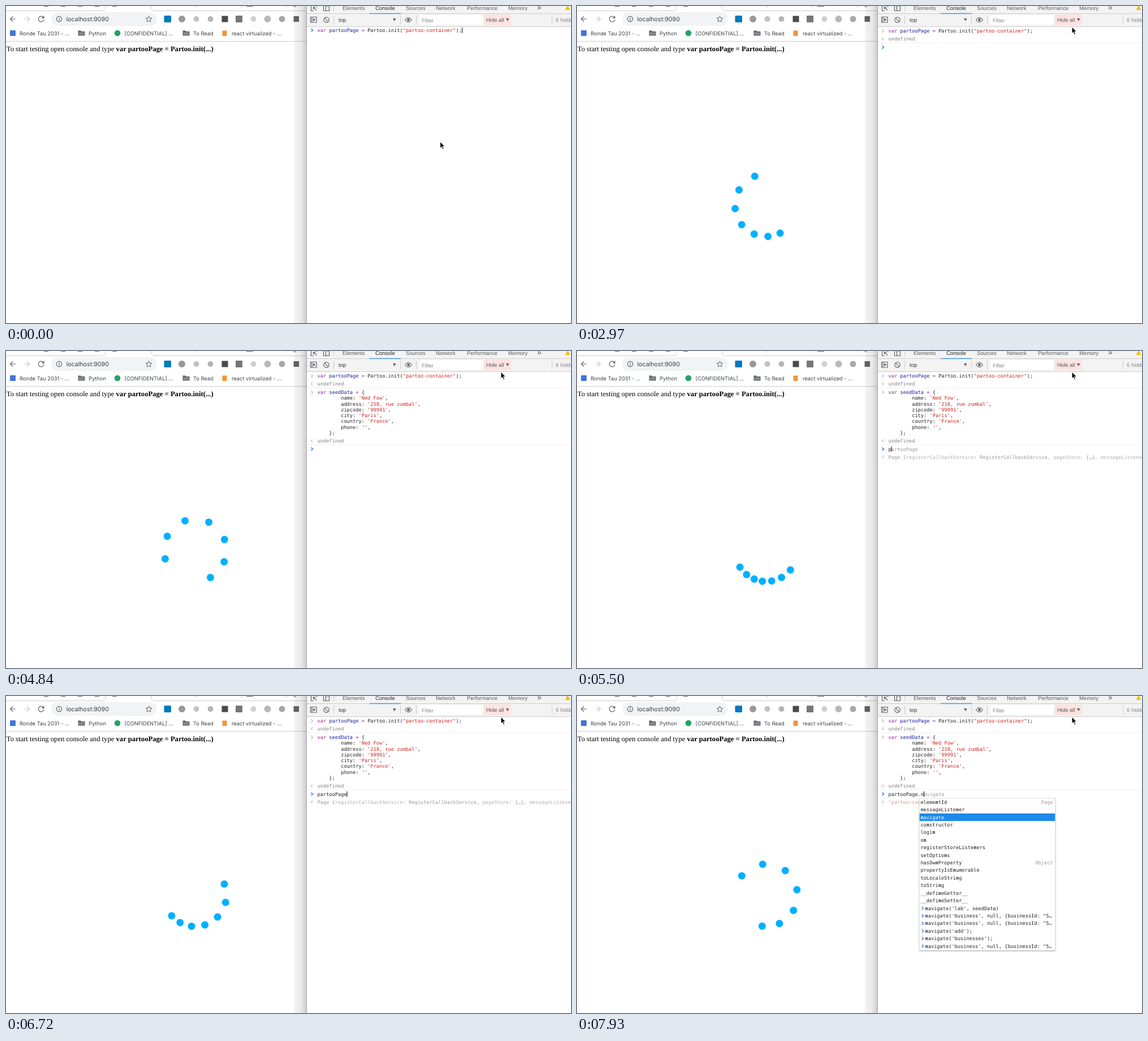
An HTML page for the animation above (8000 ms loop, 999 by 561 pixels).

```html
<!DOCTYPE html>
<html lang="en">
<head>
<meta charset="utf-8">
<title>Console demo</title>
<style>
  html, body { margin: 0; width: 100%; height: 100%; overflow: hidden; background: #fff; }
  svg { display: block; width: 999px; height: 561px; }
  text { white-space: pre; text-rendering: geometricPrecision; }
  .ui { font: 9.3px Inter, sans-serif; fill: #3c4043; }
  .page { font: 12.63px "Liberation Serif", serif; fill: #000; }
  .dev { font: 9.46px "Liberation Sans", sans-serif; fill: #5a5a5a; }
  .mono { font: 8.67px "DejaVu Sans Mono", monospace; fill: #222; }
  .line { fill: none; stroke: #5f6368; stroke-width: 1.2; }
  .rule { fill: none; stroke: #ccc; }
  .kw { fill: #a0189a; }
  .def { fill: #1a1aa6; }
  .str { fill: #d0211c; }
  .dim { fill: #808080; }
  .ghost { fill: #999; }
  .key { fill: #b0b0b0; }
  .soft { fill: #ea8f8b; }
  .hit { fill: #fff; }
  .dark { fill: #222; }
  .b { font-weight: bold; }
</style>
</head>
<body>
<svg viewBox="0 0 999 561">
  <defs>
    <linearGradient id="shade">
      <stop offset="0" stop-opacity=".04"/>
      <stop offset=".6" stop-opacity=".09"/>
      <stop offset="1" stop-opacity=".2"/>
    </linearGradient>
    <filter id="drop" x="-5%" y="-5%" width="110%" height="110%">
      <feDropShadow dx="0" dy="1" stdDeviation="1.2" flood-opacity=".4"/>
    </filter>
    <g id="folder" fill="#5f6368">
      <path d="M-6-4.500h4.500l1.500 1.500h6v7.500h-12z"/>
      <path d="M-4.800-1.700h9.600v5h-9.600z" fill="#858a8e"/>
    </g>
  </defs>

  <!-- browser window -->
  <rect width="531" height="561" fill="#fff"/>
  <path class="rule" d="M0 8.500H171Q176.500 8.500 176.500 0M256.500 0Q256.500 8.500 262 8.500H531M336.500 0V3M416.500 0V3M495.500 0V3"/>
  <path d="M67 .5h8M97 .5h8M127 .5h8M157 .5h8M188 .5h8M425 .5h12M508 0l5 2" stroke="#666" fill="none"/>
  <path class="line" d="M17 23H7.500M12 18.500L7.500 23l4.500 4.500"/>
  <path class="line" d="M32 23h9.500M37 18.500l4.500 4.500-4.500 4.500" style="stroke:#c4c6c8"/>
  <path class="line" d="M66.300 20.200a4.900 4.900 0 1 0 .8 3.600"/>
  <path d="M67.500 17.300v4.600h-4.600z" fill="#5f6368"/>
  <rect x="80" y="11" width="187" height="24" rx="12" fill="#f1f3f4"/>
  <circle class="line" cx="94" cy="23" r="4.700"/>
  <path class="line" d="M94 22.300v3.200M94 20v1.200"/>
  <text class="ui" x="106.500" y="27" style="font-size:10.7px">localhost:9090</text>
  <path class="line" d="M252.500 17.800l1.500 3.600 3.900.3-3 2.500.9 3.800-3.300-2-3.300 2 .9-3.800-3-2.500 3.900-.3z" style="stroke-width:1"/>
  <rect x="279.500" y="17" width="12.500" height="12" rx="1.500" fill="#0079bf"/>
  <circle cx="311" cy="23" r="6" fill="#999"/>
  <circle cx="336.500" cy="23" r="5" fill="#c2c2c2"/>
  <circle cx="361.500" cy="23" r="5" fill="#b4b4b4"/>
  <rect x="381.500" y="17.500" width="11" height="11" fill="#4a4a4a"/>
  <rect x="406" y="17" width="12" height="12" rx="1" fill="#777"/>
  <circle cx="437.500" cy="23" r="5" fill="#cfcfcf"/>
  <circle cx="462.500" cy="23" r="6" fill="#b8b8b8"/>
  <circle cx="488" cy="23" r="5.500" fill="#a8a8a8"/>
  <rect x="508.500" y="18" width="9.500" height="10" fill="#666"/>

  <rect x="7" y="43" width="10" height="10" rx="1" fill="#4374d9"/>
  <text class="ui" x="24" y="51.500">Ronde Tau 2031 - ...</text>
  <use href="#folder" x="133.500" y="48"/>
  <text class="ui" x="146" y="51.500">Python</text>
  <circle cx="197" cy="48" r="5.300" fill="#1fa463"/>
  <text class="ui" x="209.500" y="51.500">[CONFIDENTIAL] ...</text>
  <use href="#folder" x="318.500" y="48"/>
  <text class="ui" x="331" y="51.500">To Read</text>
  <rect x="382.500" y="43.500" width="8" height="9.500" fill="#f0963c"/>
  <text class="ui" x="399" y="51.500">react virtualized - ...</text>
  <path class="rule" d="M0 62.500H531"/>
  <text class="page" x=".8" y="80">To start testing open console and type <tspan class="b">var partooPage = Partoo.init(...)</tspan></text>
  <g id="dots" fill="#00b0ff"></g>
  <rect x="509" width="22" height="561" fill="url(#shade)"/>

  <!-- developer tools -->
  <rect x="531" width="468" height="561" fill="#fff"/>
  <rect x="531" width="468" height="36" fill="#f3f3f3"/>
  <path class="rule" d="M531 13.500H999M531 36.500H999M579.500 0V9M579.500 17V32M697.500 17V32M725.500 17V32M965.500 17V32"/>
  <path d="M531.500 0V561" stroke="#a9a9a9"/>
  <rect x="643" y="12.600" width="55" height="1.600" fill="#4a9be6"/>
  <g id="tabs" class="dev"></g>
  <path class="line" d="M544 8.500h-4.500V0M549.500 0v2M543.500 2l5.500 5.500M543.500 6V2h4M561.500 0v8.500h5M565.500 0h6v8.500h-6z"/>
  <path d="M993 -1l4.500 8h-9z" fill="#f5bd00"/>
  <path class="line" d="M538.500 19.500h10.500v9.500h-10.500zM541 19.500v9.500"/>
  <path d="M543 21.500l4.500 2.800-4.500 2.800z" fill="#5f6368"/>
  <circle class="line" cx="566.500" cy="24.500" r="4.700"/>
  <path class="line" d="M563.200 21.200l6.600 6.600"/>
  <text class="dev" x="588" y="28" style="fill:#333">top</text>
  <path d="M684 22h5.500l-2.700 5z" fill="#5f6368"/>
  <path class="line" d="M705.500 24.500q6-8 12 0q-6 8-12 0z"/>
  <circle cx="711.500" cy="24.500" r="2.400" fill="#5f6368"/>
  <rect x="731" y="16" width="112" height="17" fill="#fff"/>
  <text class="dev" x="735" y="28.500" style="fill:#858585">Filter</text>
  <rect x="845" y="15" width="48" height="19" rx="1" fill="#fde2e2"/>
  <text class="dev" x="849" y="27.500">Hide all</text>
  <path d="M884 22h5.500l-2.700 5z" fill="#5f6368"/>
  <text class="dev" x="972" y="27.500" style="fill:#888">6 hidden</text>
  <g id="console" class="mono"></g>
  <path id="caret" d="M0 0v9.500" stroke="#000"/>
  <path id="mouse" d="M0 0v11.300l2.600-2.400 1.900 4.300 1.900-.8-1.900-4.200h3.600z" stroke="#fff" stroke-width=".8"/>
</svg>
<script>
const $ = id => document.getElementById(id);
const LOOP = 8000, CHAR = 5.22, LEFT = 550.5, LEAD = 10.27, ROW = 13.42;

const last = (list, test) => list.filter(test).pop();
const text = (x, y, s, attrs = '') => `<text x="${x}" y="${y}" ${attrs}>${s}</text>`;

$('tabs').innerHTML = text(595, 6.5, 'Elements') + text(653, 6.5, 'Console', 'class="dark"') +
  text(707, 6.5, 'Sources') + text(760, 6.5, 'Network') + text(815, 6.5, 'Performance') +
  text(888, 6.5, 'Memory') + text(939, 6.5, '»', 'font-size="14"');

const INIT = 'var partooPage = Partoo.init("partoo-container");';
const SEED = `var seedData = {
        name: 'Ned Fow',
        address: '218, rue zumbal',
        zipcode: '99991',
        city: 'Paris',
        country: 'France',
        phone: '',
    };`;
const PAGE = 'Page {<tspan class="key">registerCallbackService</tspan>: RegisterCallbackService, ' +
  '<tspan class="key">pageStore</tspan>: {…}, <tspan class="key">messageListener</tspan>: …';
const NAME = '<tspan class="soft">"partoo-container"</tspan>';

// A leading ">" marks an entry from the history, "|" splits off the right-hand note.
const GLOBALS = { x: 547.5, sel: 0, items: [
  'partooPage|Window', 'Partoo', 'webpackHotUpdatePartoo',
  ...["navigate('lab', seedData)", "navigate('business', null, {bus…", "login('d48f03380ad1841077708a2a…",
    "navigate('business', null, {bus…", "navigate('add');", "navigate('businesses');", 'login()',
    "navigate('business', null, {bus…", 'login("a53462edf85017a02c95e81e…', "navigate('business')", 'back()',
    "navigate('partnerConnections')", 'login("14147cc01b694b275832b1b2…', "navigate('presenceManagement')",
    'login("8e9f0af51c2457f8c9342db7…', 'login("e5014c63e0c1cf323e5126e8…', 'on("pm_view_go_to_partner_conne…'
  ].map(s => '>partooPage.' + s)] };
const BUSINESS = `>navigate('business', null, {businessId: "5…`;
const MEMBERS = { x: 605.2, sel: 2, items: [
  'elementId|Page', 'messageListener', 'navigate', 'constructor', 'login', 'on', 'registerStoreListeners',
  'setOptions', 'hasOwnProperty|Object', 'propertyIsEnumerable', 'toLocaleString', 'toString',
  '__defineGetter__', '__defineSetter__', ">navigate('lab', seedData)", BUSINESS, BUSINESS,
  ">navigate('add');", ">navigate('businesses');", BUSINESS] };

const SCENES = [
  { at: 0, log: 0, typed: INIT },
  { at: 1050, log: 1, typed: '' },
  { at: 3610, log: 1, typed: SEED },
  { at: 3960, log: 2, typed: '' },
  { at: 5500, log: 2, typed: 'p', ghost: 'artooPage', preview: PAGE },
  { at: 5700, log: 2, typed: 'part', ghost: 'ooPage', preview: PAGE, popup: GLOBALS, query: 'part' },
  { at: 5890, log: 2, typed: 'parto', ghost: 'oPage', preview: PAGE, popup: GLOBALS, query: 'parto' },
  { at: 6570, log: 2, typed: 'partooPage', preview: PAGE },
  { at: 7230, log: 2, typed: 'partooPage.', ghost: 'elementId', preview: NAME, popup: { ...MEMBERS, sel: 0 }, query: '' },
  { at: 7750, log: 2, typed: 'partooPage.n', ghost: 'avigate', preview: NAME, popup: MEMBERS, query: 'n' }
];

const TICKS = [0, 300, 570, 1050, 1230, 1410, 1590, 1770, 1950, 2130, 2310, 2490, 2650, 2810, 2970, 3110,
  3260, 3430, 3610, 3780, 3960, 4130, 4340, 4510, 4670, 4840, 4990, 5150, 5320, 5500, 5700, 5890, 6070,
  6250, 6420, 6570, 6720, 6870, 7050, 7230, 7410, 7600, 7750, 7930];
const MOUSE = [[0, 767.7, 240.3], [300, 766.9, 226.8], [570, 875.1, 37.3]];

const chevron = (x, y, color, w = 1.3, dir = 1) =>
  `<path d="M${x - 1.5 * dir} ${y - 2.7}l${3 * dir} 2.700l${-3 * dir} 2.700" fill="none" stroke="${color}" stroke-width="${w}"/>`;
const paint = s => s.replace(/("[^"]*"|'[^']*')|\bvar\b|=|(?<=var )\w+/g, (m, str) =>
  `<tspan class="${str ? 'str' : m === 'var' || m === '=' ? 'kw' : 'def'}">${m}</tspan>`);
const code = (s, y) => s.split('\n').map((l, i) => text(LEFT, y + i * LEAD, paint(l))).join('');
const result = (s, y, cls) => chevron(540.5, y - 3, '#a5a5a5', 1, -1) +
  `<circle cx="543" cy="${y - 3}" r=".6" fill="#a5a5a5"/>` + text(LEFT, y, s, `class="${cls}"`);
const entry = (s, y, end) => chevron(541, y - 3, '#8a8a8a', 1) + code(s, y) + result('undefined', end, 'dim') +
  `<path d="M532 ${end + 4}h467" stroke="#f0f0f0"/>`;

function emphasize(s, query) {
  const i = s.toLowerCase().indexOf(query), j = i + query.length;
  return query && i >= 0 ? `${s.slice(0, i)}<tspan class="b">${s.slice(i, j)}</tspan>${s.slice(j)}` : s;
}

function popup({ x, sel, items }, query) {
  const top = 181, rows = items.map((item, i) => {
    const past = item[0] === '>', [label, note] = item.slice(past).split('|');
    const y = top + i * ROW, base = y + 9.7, cls = i === sel ? 'class="hit"' : '';
    return (i === sel ? `<rect x="${x + .5}" y="${y}" width="239.500" height="${ROW}" fill="#1e8ae8"/>` : '') +
      (past ? chevron(x + 6, base - 3, '#3b7de0') : '') +
      text(x + (past ? 10.3 : 2.2), base, emphasize(label, query), cls) +
      (note ? text(x + 236.5, base, note, `text-anchor="end" ${cls || 'class="ghost"'}`) : '');
  });
  return `<rect x="${x}" y="${top}" width="240.500" height="${ROW * 20 + .6}" fill="#fff" stroke="#ccc" stroke-width=".5" filter="url(#drop)"/>` + rows.join('');
}

const promptY = s => [46, 76, 176.5][s.log];

function view(s) {
  const y = promptY(s);
  return (s.log > 0 ? entry(INIT, 47, 61) : '') + (s.log > 1 ? entry(SEED, 76, 162) : '') +
    chevron(541, y - 3, '#367cf1', 1.5) + code(s.typed, y) +
    (s.ghost ? text(LEFT + s.typed.length * CHAR, y, s.ghost, 'class="ghost"') : '') +
    (s.preview ? result(s.preview, y + 14, 'ghost') : '') +
    (s.popup ? popup(s.popup, s.query) : '');
}

// cubic-bezier(.5, 0, .5, 1)
function ease(x) {
  let lo = 0, hi = 1;
  for (let i = 0; i < 24; i++) {
    const u = (lo + hi) / 2;
    if (1.5 * u - 1.5 * u * u + u ** 3 < x) lo = u; else hi = u;
  }
  return lo * lo * (3 - 2 * lo);
}

function dots(t) {
  if (t < 1410) return '';
  return Array.from({ length: 7 }, (_, i) => {
    const turn = ease(((t - 1274) / 1485.5 + i / 24) % 1);
    const a = (52.5 + 15 * i + 360 * turn) * Math.PI / 180;
    return `<circle cx="${334.5 + 55.2 * Math.cos(a)}" cy="${352.6 + 55.2 * Math.sin(a)}" r="6.500"/>`;
  }).join('');
}

let shownScene, shownTick;
function draw(now) {
  const t = last(TICKS, k => k <= now % LOOP);
  if (t === shownTick) return;
  shownTick = t;
  const scene = last(SCENES, s => s.at <= t);
  if (scene !== shownScene) $('console').innerHTML = view(shownScene = scene);

  const lines = scene.typed.split('\n'), row = lines.length - 1;
  const x = LEFT + lines[row].length * CHAR + .3, y = promptY(scene) + row * LEAD - 7.7;
  $('caret').setAttribute('transform', `translate(${x} ${y})`);
  $('caret').style.display = !scene.at || (t - scene.at) % 1238 < 619 ? '' : 'none';

  const [, mx, my] = last(MOUSE, m => m[0] <= t);
  $('mouse').setAttribute('transform', `translate(${mx} ${my})`);
  $('dots').innerHTML = dots(t);
}

const start = performance.now();
function frame() {
  draw(performance.now() - start);
  requestAnimationFrame(frame);
}
frame();
</script>
</body>
</html>
```
